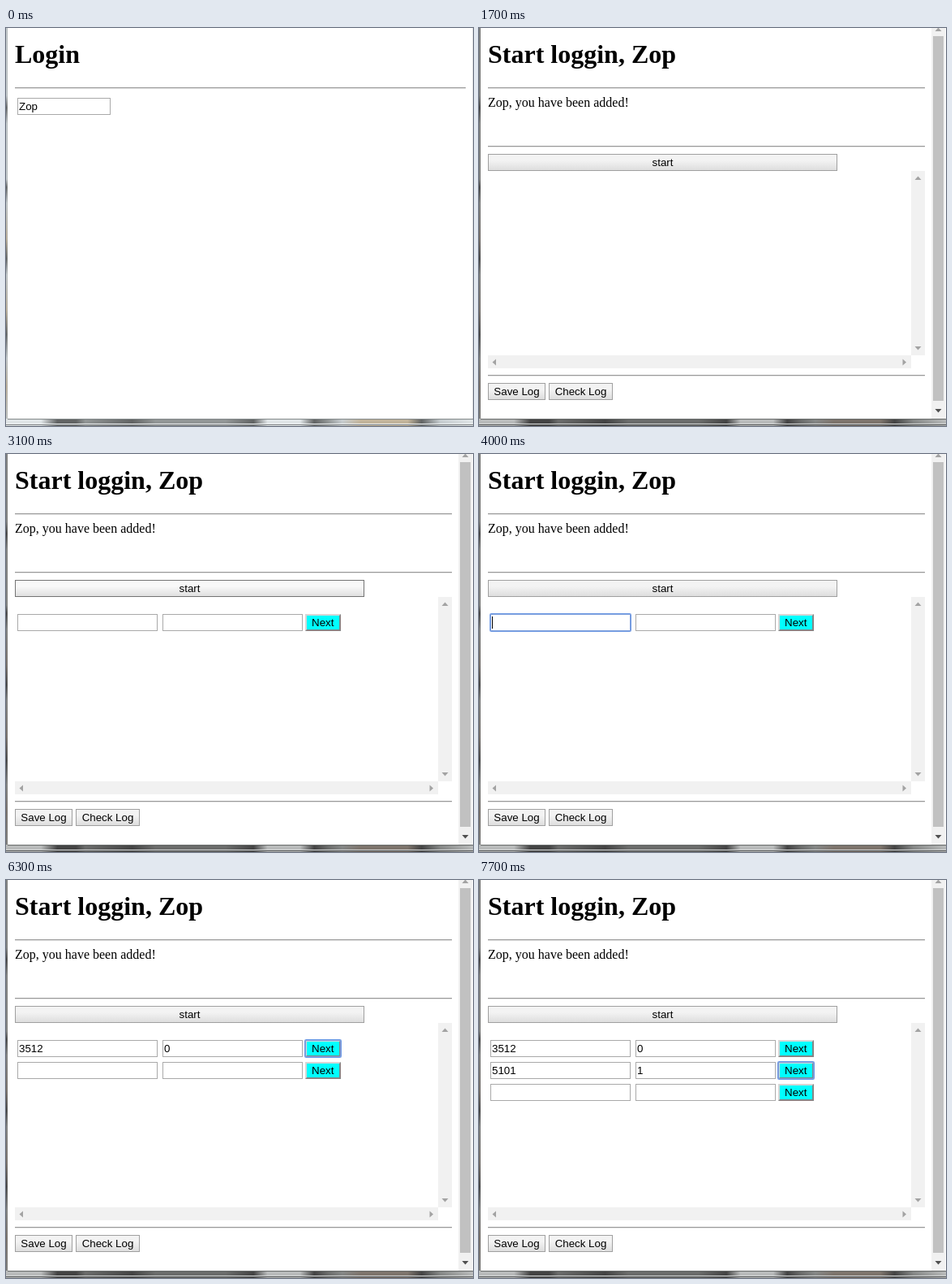
Animation, 576 px wide and 490 px high, one loop 8000 ms. Source, as an HTML page with a canvas:

```html
<!DOCTYPE html>
<html lang="en">
<head>
<meta charset="utf-8">
<title>Login and log form</title>
<style>
html, body { margin: 0; width: 576px; height: 490px; overflow: hidden; background: #fff; }
canvas { display: block; }
</style>
</head>
<body>
<canvas id="stage" width="576" height="490"></canvas>
<script>
const ctx = document.getElementById('stage').getContext('2d');
const LOOP = 8000;
const USER = 'Zop';
const SANS = '13.333px "Liberation Sans", Arial, sans-serif';
const SERIF = '16px "Liberation Serif", Times, serif';
const HEADING = 'bold 32px "Liberation Serif", Times, serif';

function rect(x, y, w, h, color) {
  ctx.fillStyle = color;
  ctx.fillRect(x, y, w, h);
}

function frame(x, y, w, h, color) {
  ctx.strokeStyle = color;
  ctx.lineWidth = 1;
  ctx.strokeRect(x + .5, y + .5, w - 1, h - 1);
}

function text(s, x, y, font = SANS, align = 'left') {
  ctx.font = font;
  ctx.textAlign = align;
  ctx.fillStyle = '#000';
  ctx.fillText(s, x, y);
}

function gradient(x0, y0, x1, y1, stops) {
  const g = ctx.createLinearGradient(x0, y0, x1, y1);
  stops.forEach(([at, color]) => g.addColorStop(at, color));
  return g;
}

function rule(y, right) {
  rect(11, y, right - 11, 1, '#9a9a9a');
  rect(11, y + 1, right - 11, 1, '#e2e2e2');
}

function focusRing(x, y, w, h) {
  ctx.strokeStyle = '#6f9ae4';
  ctx.lineWidth = 1;
  ctx.beginPath();
  ctx.roundRect(x - .5, y - .5, w + 1, h + 1, 1);
  ctx.stroke();
}

function field(x, y, w, value, focused, caretX) {
  rect(x, y, w, 21, '#fff');
  frame(x, y, w, 21, focused ? '#7d9fdc' : '#a9a9a9');
  if (focused) focusRing(x, y, w, 21);
  text(value, x + 2, y + 15);
  if (caretX) rect(caretX, y + 3, 1, 15, '#000');
}

function button(x, y, w, label, state = 'normal') {
  const fills = {
    normal: ['#f3f3f3', '#dcdcdc'],
    hover: ['#f8f8f8', '#dedede'],
    pressed: ['#dcdcdc', '#f1f1f1']
  };
  const [top, bottom] = fills[state];
  rect(x, y, w, 21, gradient(0, y, 0, y + 21, [[0, top], [.38, top], [1, bottom]]));
  frame(x, y, w, 21, state === 'normal' ? '#a0a0a0' : '#747474');
  text(label, x + w / 2, y + 15, SANS, 'center');
}

function nextButton(y, focused) {
  const x = 369, w = 44, h = 21;
  rect(x, y, w, h, '#d6d6d6');
  ctx.fillStyle = '#858585';
  ctx.beginPath();
  ctx.moveTo(x + w, y);
  ctx.lineTo(x + w, y + h);
  ctx.lineTo(x, y + h);
  ctx.lineTo(x + 2, y + h - 2);
  ctx.lineTo(x + w - 2, y + h - 2);
  ctx.lineTo(x + w - 2, y + 2);
  ctx.fill();
  rect(x + 2, y + 2, w - 4, h - 4, '#0ff');
  if (focused) {
    focusRing(x, y, w, h);
    frame(x, y, w, h, '#7d9fdc');
  }
  text('Next', 377, y + 15);
}

function arrow(x, y, angle, color) {
  ctx.save();
  ctx.translate(x, y);
  ctx.rotate(angle * Math.PI / 2);
  ctx.fillStyle = color;
  ctx.beginPath();
  ctx.moveTo(0, -2.5);
  ctx.lineTo(4, 2);
  ctx.lineTo(-4, 2);
  ctx.fill();
  ctx.restore();
}

// Blurred desktop showing through the translucent window border.
function windowEdges(active) {
  const light = active ? '#858786' : '#c6cccf';
  const mid = active ? '#6b6c6b' : '#929696';
  const dark = active ? '#434343' : '#626464';
  const pale = active ? '#b9bbbb' : '#e0e5e7';
  const tan = active ? '#7d746c' : '#c2b49b';
  rect(0, 0, 2, 490, gradient(0, 0, 0, 490, [
    [0, light], [.17, light], [.2, dark], [.24, light], [.38, light],
    [.4, dark], [.44, light], [.53, tan], [.58, dark], [.62, light],
    [.71, tan], [.77, dark], [.83, light], [.9, tan], [1, light]
  ]));
  rect(1, 0, 1, 481, active ? 'rgba(110,110,110,.45)' : 'rgba(150,155,158,.4)');
  rect(0, 481, 576, 9, gradient(0, 0, 576, 0, [
    [0, pale], [.075, pale], [.11, dark], [.15, dark], [.17, mid],
    [.27, dark], [.32, mid], [.47, mid], [.53, dark], [.56, pale],
    [.63, pale], [.66, dark], [.69, mid], [.72, light], [.76, tan],
    [.86, tan], [.89, dark], [.93, light], [1, pale]
  ]));
  rect(2, 481, 574, 1, active ? '#686b6a' : '#83898a');
  rect(0, 487, 576, 1, active ? '#d5d7d7' : '#edf0f1');
  rect(0, 488, 576, 1, active ? '#505252' : '#7b7f81');
}

function loginPage(t) {
  const focused = t >= 900;
  text('Login', 11, 43, HEADING);
  rule(73, 567);
  field(14, 86, 115, USER, focused, focused && t < 1400 && 39);
  rect(575, 0, 1, 481, '#ececec');
}

function scrollbars() {
  rect(558, 0, 17, 481, '#f1f1f1');
  rect(560, 10, 13, 449, '#c1c1c1');
  arrow(566.5, 2, 0, '#a3a3a3');
  arrow(566.5, 471, 2, '#505050');
  rect(533, 176, 17, 227, '#f1f1f1');
  rect(11, 403, 522, 16, '#f1f1f1');
  arrow(541.5, 185, 0, '#a3a3a3');
  arrow(541.5, 394, 2, '#a3a3a3');
  arrow(19, 411.5, 3, '#a3a3a3');
  arrow(524.5, 411.5, 1, '#a3a3a3');
}

function logRows(t) {
  const within = (from, to) => t >= from && t < to;
  if (t < 3100) return;
  const caret1 = within(4500, 4900) ? 195 : within(5200, 5700) && 202;
  field(14, 197, 173, t >= 6300 ? '3512' : '', within(4000, 4500), within(4000, 4500) && 16);
  field(193, 197, 173, t >= 5200 ? '0' : '', within(4500, 6200), caret1);
  nextButton(197, within(6200, 6800));
  if (t < 6300) return;
  const caret2 = within(6800, 7200) ? 195 : within(7200, 7700) && 202;
  field(14, 224, 173, t >= 7700 ? '5101' : '');
  field(193, 224, 173, t >= 7200 ? '1' : '', within(6800, 7700), caret2);
  nextButton(224, t >= 7700);
  if (t < 7700) return;
  field(14, 251, 173, '');
  field(193, 251, 173, '');
  nextButton(251);
}

function logPage(t) {
  text(`Start loggin, ${USER}`, 11, 43, HEADING);
  [73, 145, 427].forEach(y => rule(y, 550));
  text(`${USER}, you have been added!`, 11, 97, SERIF);
  const hovered = t >= 2700 && t < 3700;
  const pressed = t >= 3000 && t < 3100;
  button(11, 155, 431, 'start', pressed ? 'pressed' : hovered ? 'hover' : 'normal');
  scrollbars();
  logRows(t);
  button(11, 437, 71, 'Save Log');
  button(86, 437, 79, 'Check Log');
}

function draw(now) {
  const t = now % LOOP;
  rect(0, 0, 576, 490, '#fff');
  windowEdges(t >= 900);
  if (t < 1700) loginPage(t);
  else logPage(t);
  requestAnimationFrame(draw);
}

requestAnimationFrame(draw);
</script>
</body>
</html>
```
